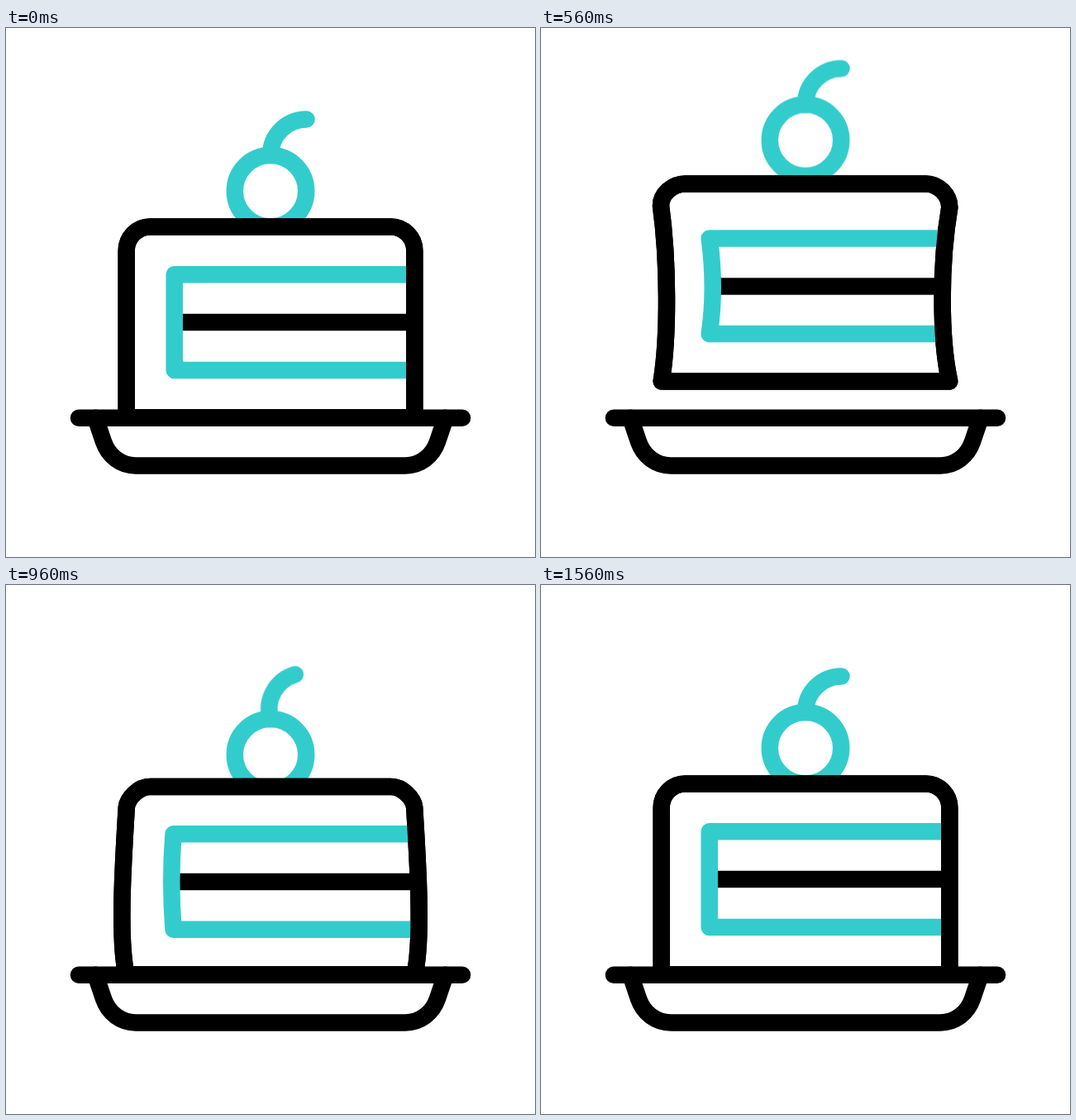
These frames come from a looping animation (640 px wide and 640 px high, 1840 ms). An HTML page without scripts:

```html
<!DOCTYPE html>
<html lang="en">
<head>
<meta charset="utf-8">
<title>Jumping cake</title>
<style>
  html, body { margin: 0; width: 100%; height: 100%; overflow: hidden; background: #fff; }
  svg { display: block; width: 100%; height: 100%; }
  path, circle { fill: none; stroke: #000; stroke-width: 20.5; stroke-linecap: round; stroke-linejoin: round; }
  .teal { stroke: #3cc; }
  .butt { stroke-linecap: butt; }

  .morph, .jump, .cherry, .stem { animation: 1840ms ease-in-out infinite; }
  .morph { animation-name: morph; }
  .jump { animation-name: jump; }
  .cherry { animation-name: cherry; }
  .stem { animation-name: sway; transform-origin: 320px 154px; }

  /* Each morphing part has four poses: rest, squash, stretch and land. */
  .body {
    --rest: path("M145.7 471.5 C145.7 405 145.7 336 145.7 269.4 C145.7 253.4 158.6 240.4 174.5 240.4 H465.5 C481.4 240.4 494.3 253.4 494.3 269.4 C494.3 336 494.3 405 494.3 471.5 Z");
    --squash: path("M145.7 471.5 C125 425 125 345 145.7 275 C150 265 161 250.6 174.5 250.6 H465.5 C479 250.6 490 265 494.3 275 C513 355 519 435 494.3 471.5 Z");
    --stretch: path("M145.7 471.5 C154.5 417 154 325 145 259 C145 245 159 232.4 174.5 232.4 H465.5 C481 232.4 494.3 246 494.3 261 C483 328 482.5 418 494.3 471.5 Z");
    --land: path("M145.7 471.5 C136 430 142 335 145.8 269 C147 258 160 244 174.5 244 H465.5 C480 244 493 258 494.2 269 C498 335 504 430 494.3 471.5 Z");
  }
  .layer {
    --rest: path("M494 298.2 H203.7 C203.7 337 203.7 375 203.7 413.9 H494");
    --squash: path("M506 307.6 H203.3 C191.5 346 191.5 385 203.3 423.2 H506");
    --stretch: path("M487 298.6 H203.7 C209 338 209 378 203.7 414.1 H487");
    --land: path("M498 301.2 H202.5 C199.8 337 199.8 380 202.5 416.7 H498");
  }
  .cream {
    --rest: path("M204 356 H494");
    --squash: path("M196 365.5 H508");
    --stretch: path("M208 356.4 H487");
    --land: path("M201 359 H499");
  }

  @keyframes morph {
    0%, 6.52% { d: var(--rest); }
    21.74% { d: var(--squash); }
    30.43% { d: var(--stretch); }
    45.65% { d: var(--rest); animation-timing-function: ease-in; }
    52.17% { d: var(--land); animation-timing-function: ease-out; }
    58.7% { d: var(--squash); }
    69.57% { d: var(--stretch); }
    84.78%, 100% { d: var(--rest); }
  }
  @keyframes jump {
    0%, 25% { transform: none; animation-timing-function: cubic-bezier(.33, .67, .67, 1); }
    37.23% { transform: translateY(-63px); animation-timing-function: cubic-bezier(.33, 0, .67, .33); }
    50.05%, 100% { transform: none; }
  }
  @keyframes cherry {
    0%, 6.52% { transform: none; }
    21.74% { transform: translateY(10px); }
    30.43% { transform: translateY(-17.5px); }
    36.96% { transform: translateY(-18px); }
    43.48% { transform: translateY(-10px); animation-timing-function: linear; }
    52.17% { transform: translateY(8px); animation-timing-function: ease-out; }
    58.7% { transform: translateY(11px); }
    69.57% { transform: translateY(-8.3px); }
    84.78%, 100% { transform: none; }
  }
  @keyframes sway {
    0%, 30.43% { transform: none; }
    47.83% { transform: rotate(-16.5deg); }
    81.5%, 100% { transform: none; }
  }
</style>
</head>
<body>
<svg viewBox="0 0 640 640">
  <g class="jump">
    <g class="cherry">
      <path class="teal stem" d="M320 154 A43.5 43.5 0 0 1 363.5 110.5"/>
      <circle class="teal" cx="320" cy="197.3" r="43.2"/>
    </g>
    <path class="body morph" style="fill: #fff"/>
    <path class="cream morph butt"/>
    <path class="layer morph teal butt"/>
    <path class="body morph"/>
  </g>
  <path d="M88 471.7 H552"/>
  <path d="M108.3 471.7 L118 500.5 C124 518 139 529.4 157 529.4 H483 C501 529.4 516 518 522 500.5 L531.7 471.7"/>
</svg>
</body>
</html>
```
